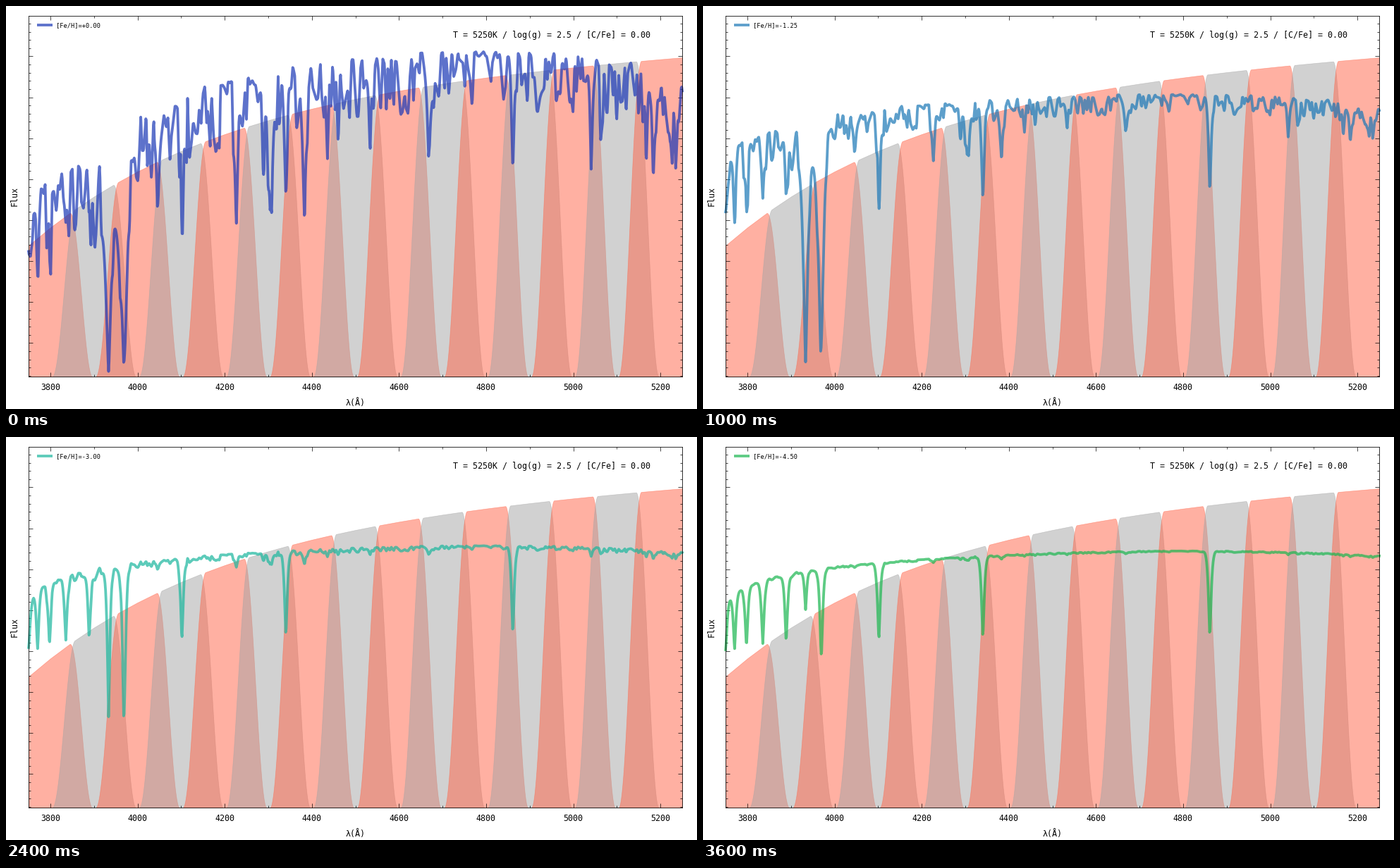
A matplotlib script for the animation above (3800 ms loop, 980 by 572 pixels).

```python
import colorsys

import matplotlib.pyplot as plt
import numpy as np
from matplotlib.animation import FuncAnimation

W, H, DPI = 980, 572, 100
LEFT, RIGHT, TOP, BOTTOM = 32, 959, 14, 526
ZERO = 536.6          # height of zero flux, just below the axes
LAM0, LAM1 = 3750, 5250
FRAMES, STEP = 19, 200
PX = 72 / DPI

plt.rcParams["font.family"] = "DejaVu Sans Mono"

# A few strong metal lines: wavelength, depth
STRONG = [(4045.8, .4), (4226.7, .6), (4290, .3), (4300, .45), (4308, .4),
          (4383.5, .6), (4534, .25), (4668, .25), (5041, .3),
          (5167.5, .35), (5183.6, .38), (5227, .28)]

x = np.linspace(LEFT, RIGHT, 1300)


def to_px(lam):
    return LEFT + (lam - LAM0) * (RIGHT - LEFT) / (LAM1 - LAM0)


def to_lam(px):
    return LAM0 + (px - LEFT) * (LAM1 - LAM0) / (RIGHT - LEFT)


def dip(lam, width):
    """Pointed line profile with soft wings."""
    return np.exp(-(np.abs(x - to_px(lam)) / width) ** 1.3)


def hydrogen():
    """Balmer series from H-beta down to the blue end."""
    tau = np.zeros_like(x)
    for n in range(4, 13):
        lam = 3646 * n * n / (n * n - 4)
        tau += (.39 - .015 * (n - 4)) * dip(lam, 2.5)
    return tau


def metals():
    """Jagged forest of weak lines, denser to the blue."""
    rng = np.random.default_rng(11)
    px = np.arange(LEFT, RIGHT + 3, 2.6)
    px = px + rng.uniform(-.8, .8, px.size)
    amp = (.19 + .38 * np.exp(-(px - LEFT) / 170)
           + .06 * np.clip((px - 700) / 260, 0, 1))
    tau = amp * rng.random(px.size) ** 1.6
    tau *= np.where(rng.random(px.size) < .08, 1.7, 1)
    forest = np.interp(x, px, tau)
    return forest + sum(d * dip(lam, 2.2) for lam, d in STRONG)


H_TAU = hydrogen()
M_TAU = metals()
CONTINUUM = (374.6 - 8.3e-5 * (x - 690) ** 2
             - 32 * np.exp(-(x - LEFT) / 50))


def calcium(m):
    """Share of light left by the Ca K and H lines."""
    depth = 3 / (1 + np.exp((m - 2.4) / .75))
    width = 2.2 + 4.6 * np.exp(-(m / 1.9) ** 2)
    k = 1 - (1 - np.exp(-depth)) * dip(3933.7, width)
    h = 1 - (1 - np.exp(-.76 * depth)) * dip(3968.5, width)
    return k * h


def spectrum(m):
    """Curve height for a metallicity of -m."""
    s = np.exp(-.83 * m)
    lift = .25 * (np.exp(-.7 * m) - .04)
    blanket = (.35 * np.exp(-np.clip(x - 60, 0, None) / 150) * s ** 3
               + .06 * np.clip((x - 700) / 260, 0, 1) ** 2 * s)
    flux = CONTINUUM * np.exp(lift - blanket - H_TAU - s * M_TAU)
    return ZERO - flux * calcium(m)


def colour(m):
    return colorsys.hls_to_rgb((229 - 19.6 * m) / 360, .406, .76)


def filter_top(lam):
    """Response curve, straight between nodes 50 angstrom apart."""
    nodes = np.arange(LAM0, LAM1 + 1, 50)
    u = (nodes - LAM0) / (LAM1 - LAM0)
    return np.interp(lam, nodes, 117 - 51.4 * u + 223 * np.exp(-3.4 * u))


fig = plt.figure(figsize=(W / DPI, H / DPI), dpi=DPI, facecolor="white")
ax = fig.add_axes([LEFT / W, 1 - BOTTOM / H,
                   (RIGHT - LEFT) / W, (BOTTOM - TOP) / H])
ax.set_xlim(LAM0, LAM1)
ax.set_ylim(BOTTOM, TOP)


def label(px, py, text, size=11.63, **kw):
    return fig.text(px / W, 1 - py / H, text, fontsize=size * PX, **kw)


def draw_filters():
    lam = np.arange(LAM0, LAM1 + .1, .5)
    top = filter_top(lam)
    for n, centre in enumerate(range(3800, 5201, 100)):
        # the outermost filters stay flat up to the plot edge
        inner = np.clip(lam, 3800, 5200)
        d = np.abs(inner - centre)
        taper = .5 + .5 * np.cos(np.pi * np.clip((d - 44) / 52, 0, 1))
        on = d < 96
        ax.fill_between(lam[on], (BOTTOM - (BOTTOM - top) * taper)[on],
                        BOTTOM, color=(.645,) * 3 if n % 2 else "tomato",
                        alpha=.5, lw=.7 * PX, zorder=1)


def draw_axes():
    ax.set_xticks(range(3800, 5201, 200))
    ax.set_xticks(range(3900, 5201, 200), minor=True)
    ax.set_yticks([ZERO - 58.15 * k for k in range(1, 9)])
    ax.set_yticks([ZERO - 11.63 * k for k in range(1, 45) if k % 5],
                  minor=True)
    for which, size in (("major", 6), ("minor", 3)):
        ax.tick_params(which=which, direction="in", length=size * PX,
                       width=.7 * PX, top=True, right=True,
                       labelbottom=False, labelleft=False)
    for spine in ax.spines.values():
        spine.set_linewidth(.8 * PX)
    for lam in range(3800, 5201, 200):
        label(to_px(lam), 545, str(lam), ha="center")
    label(495.5, 566.5, "λ(Å)", ha="center")
    label(12, 270, "Flux", ha="center", va="center", rotation=90)
    label(634, 45, "T = 5250K / log(g) = 2.5 / [C/Fe] = 0.00")


draw_filters()
draw_axes()
style = dict(lw=3.8 * PX, alpha=.7, solid_joinstyle="round", zorder=2.2)
curve, = ax.plot(to_lam(x), spectrum(0), clip_on=False,
                 solid_capstyle="projecting", **style)
key, = ax.plot(to_lam(np.array([44, 66])), [26.5, 26.5],
               solid_capstyle="butt", **style)
name = label(71, 30, "", 8.7)


def update(i):
    m = .25 * i
    curve.set_ydata(spectrum(m))
    for line in (curve, key):
        line.set_color(colour(m))
    name.set_text(f"[Fe/H]={0.0 - m:+.2f}")
    return curve, key, name


anim = FuncAnimation(fig, update, frames=FRAMES, interval=STEP,
                     repeat=True, repeat_delay=0)
plt.show()
```
